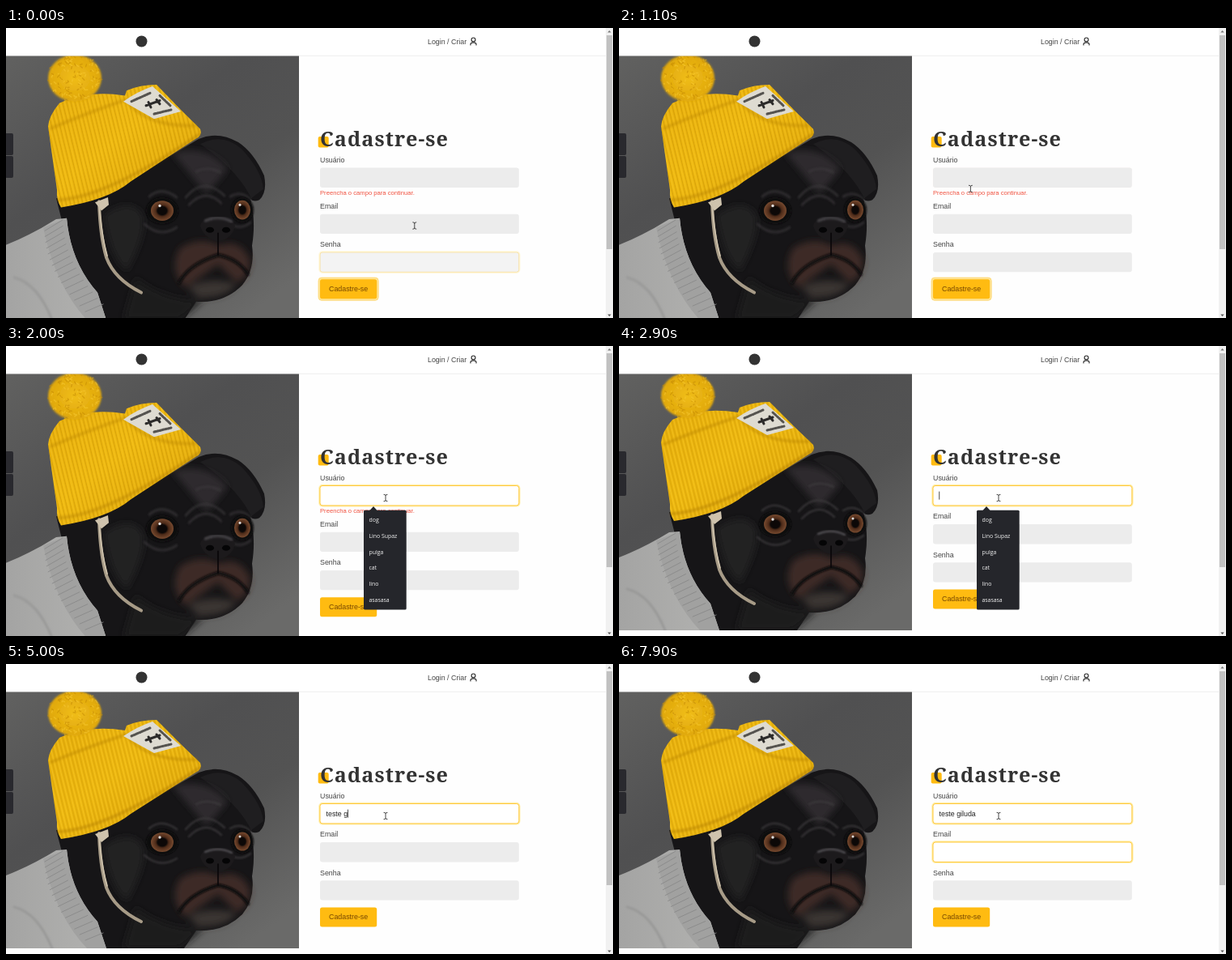
These frames come from a looping animation (750x358 px, 8000 ms). An HTML page:

```html
<!DOCTYPE html>
<html lang="pt-BR">
<head>
<meta charset="utf-8">
<title>Cadastre-se</title>
<style>
html, body { margin: 0; width: 100%; height: 100%; overflow: hidden; background: #fefefe; }
svg { display: block; width: 100vw; height: 100vh; }
text { font: 8.85px "Liberation Sans", Arial, sans-serif; fill: #444; white-space: pre; }
.title { font: bold 25.2px "Noto Serif", Georgia, serif; letter-spacing: .04em; fill: #333; }
.error { font-size: 7.65px; fill: #f0513f; }
.list text { font: 6.9px "Open Sans", "Noto Sans", sans-serif; fill: #f4f4f4; }
.typed { fill: #222; }
.line { fill: none; stroke-linecap: round; stroke-linejoin: round; }
</style>
</head>
<body>
<svg viewBox="0 0 750 358" preserveAspectRatio="none">
  <defs>
    <linearGradient id="wall" x1="0" y1="0" x2=".8" y2="1">
      <stop offset="0" stop-color="#616160"/><stop offset=".4" stop-color="#505051"/><stop offset=".65" stop-color="#535353"/><stop offset="1" stop-color="#6a6a69"/>
    </linearGradient>
    <linearGradient id="wool" x1="0" y1="0" x2="1" y2="1">
      <stop offset="0" stop-color="#e8b00c"/><stop offset=".45" stop-color="#f0bb10"/><stop offset="1" stop-color="#d9a108"/>
    </linearGradient>
    <radialGradient id="pom"><stop offset="0" stop-color="#f0bd1a"/><stop offset="1" stop-color="#dfa70b"/></radialGradient>
    <linearGradient id="shirt"><stop offset="0" stop-color="#a4a4a3"/><stop offset="1" stop-color="#b2b2b0"/></linearGradient>
    <radialGradient id="iris"><stop offset=".4" stop-color="#0c0807"/><stop offset=".58" stop-color="#4d2b19"/><stop offset="1" stop-color="#774a2f"/></radialGradient>
    <pattern id="rib" width="5" height="6" patternUnits="userSpaceOnUse" patternTransform="rotate(-14)">
      <path d="M1 0V6" stroke="#b98503" stroke-width="1" opacity=".5"/>
      <path d="M3.5 0V6" stroke="#f9cc3c" stroke-width=".8" opacity=".4"/>
    </pattern>
    <filter id="soft" x="-30%" y="-30%" width="160%" height="160%"><feGaussianBlur stdDeviation="4"/></filter>
    <filter id="fuzz" x="-30%" y="-30%" width="160%" height="160%"><feGaussianBlur stdDeviation="1.3"/></filter>
    <clipPath id="frame"><rect y="34" width="362" height="317"/></clipPath>
    <path id="cap" d="M52 119Q53 106 66 91 100 75 147 82L149 76Q166 69 186 69L216 99 240 122Q243 130 234 134L154 185Q127 207 68 216 62 207 63 195Z"/>
  </defs>

  <g id="photo"><g clip-path="url(#frame)">
    <rect y="34" width="362" height="317" fill="url(#wall)"/>
    <path d="M62 205L128 195 210 150 238 134Q262 124 287 138 306 150 319 178 323 198 313 207 306 210 302 206 309 232 304 262 308 290 292 309 270 331 235 329L220 351H100Z" fill="#161517"/>
    <path d="M240 140Q268 126 291 146 316 172 318 194L303 205Q286 171 240 140Z" fill="#1f1e20"/>
    <g filter="url(#soft)">
      <path d="M120 225Q150 205 165 220T150 292Q130 280 120 225" fill="#232224"/>
      <path d="M205 150Q250 140 274 170L248 200Z" fill="#2d2c2d"/>
      <path d="M215 265Q240 250 262 262 290 252 302 280 300 300 285 306L262 284 222 312Q200 292 215 265" fill="#3d2c26"/>
      <path d="M225 312Q250 298 285 308 270 326 238 324" fill="#3a3431"/>
      <path d="M160 300Q200 330 245 326L215 351H145Z" fill="#1d1c1d"/>
    </g>
    <g class="line" stroke="#3d3b3d" stroke-width="2.5" filter="url(#fuzz)" opacity=".75">
      <path d="M177 203Q192 190 211 204M222 204Q244 178 270 202M226 213Q246 192 266 211M171 236Q190 253 211 240M277 203Q291 195 302 207M281 238Q292 242 302 234M235 173Q249 166 265 174"/>
    </g>
    <path d="M214 306Q226 284 262 273 286 277 299 296" class="line" stroke="#0b090a" stroke-width="4" filter="url(#fuzz)"/>
    <path d="M240 238Q244 226 262 227 280 227 283 238 280 253 263 257 244 253 240 238" fill="#1c1a1c"/>
    <path d="M246 232Q262 225 279 233" class="line" stroke="#59575b" stroke-width="2" filter="url(#fuzz)"/>
    <ellipse cx="252" cy="243" rx="5" ry="3.5" fill="#050506"/><ellipse cx="272" cy="243" rx="5" ry="3.5" fill="#050506"/>
    <path d="M262 247V273" class="line" stroke="#080608" stroke-width="1.6"/>
    <ellipse cx="193" cy="220" rx="20" ry="16" fill="#0a090a" filter="url(#fuzz)"/><ellipse cx="292" cy="219" rx="14" ry="15" fill="#0a090a" filter="url(#fuzz)"/>
    <ellipse cx="193" cy="220" rx="14" ry="12" fill="url(#iris)"/><ellipse cx="292" cy="219" rx="10" ry="11.5" fill="url(#iris)"/>
    <g fill="#ddd"><circle cx="190" cy="214" r="1.7"/><circle cx="289" cy="213" r="1.5"/></g>

    <path d="M0 261Q31 249 62 230L75 229Q80 282 113 318L124 351H0Z" fill="url(#shirt)"/>
    <path d="M46 240L75 229Q80 282 113 318L124 351H100Q61 310 46 240" fill="#a1a1a0"/>
    <g id="ribs" class="line" stroke="#8a8a8a" stroke-width=".9"></g>
    <path d="M10 300Q39 307 57 351" class="line" stroke="#999998" stroke-width="3" filter="url(#fuzz)"/>
    <path d="M115 209Q116 249 124 276 134 302 167 318" class="line" stroke="#a79b87" stroke-width="4"/>
    <path d="M110 210L126 204 127 213 118 220Z" fill="#cfc3ad"/>
    <path d="M115 212Q118 250 125 274" class="line" stroke="#cdc1ab" stroke-width="1.8"/>

    <use href="#cap" fill="url(#wool)"/>
    <use href="#cap" fill="url(#rib)"/>
    <path d="M56 121Q102 102 148 87 173 120 234 118" class="line" stroke="#b88304" stroke-width="4" opacity=".4" filter="url(#fuzz)"/>
    <path d="M65 207Q125 204 238 129" class="line" stroke="#ad7904" stroke-width="4" opacity=".4" filter="url(#fuzz)"/>
    <ellipse cx="85" cy="61" rx="33" ry="28" fill="url(#pom)" filter="url(#fuzz)"/>
    <g id="tufts" class="line" stroke-width="1.4" opacity=".6"></g>
    <path d="M145 89Q163 77 181 71L216 101 183 110Z" fill="#dedbd1"/>
    <path d="M155 89L178 79M183 104L204 99M190 82L203 94" class="line" stroke="#55534f" stroke-width="3" stroke-dasharray="2 1.5"/>
    <path d="M173 94L190 88M176 90L179 96M186 87L190 92" class="line" stroke="#2c2b2a" stroke-width="3"/>
  </g></g>

  <path d="M0 130H7Q9 130 9 132V155Q9 157 7 157H0ZM0 158H7Q9 158 9 160V183Q9 185 7 185H0Z" fill="#29292e"/>
  <rect width="741" height="34" fill="#fff"/>
  <path d="M0 34.3H741" stroke="#e8e8e8" stroke-width=".7"/>
  <circle cx="167.5" cy="16.5" r="7" fill="#333"/>
  <text x="521" y="19.5">Login / Criar</text>
  <g class="line" stroke="#333" stroke-width="1.2"><circle cx="577.5" cy="14.4" r="2.4"/><path d="M574 21V20Q574.2 17.8 577.5 17.8T581 20V21"/></g>

  <rect x="741" width="9" height="358" fill="#f1f1f1"/>
  <rect x="742" y="9" width="7" height="264" fill="#c1c1c1"/>
  <path d="M743.3 5.5L745.5 3 747.7 5.5Z" fill="#777"/><path d="M743.3 353.5L745.5 356 747.7 353.5Z" fill="#555"/>

  <rect x="385.7" y="134" width="13" height="13.5" rx="2" fill="#fb1"/>
  <text class="title" x="388" y="146">Cadastre-se</text>

  <g id="user" transform="translate(388 172.5)"></g>
  <text id="error" class="error" x="388" y="206">Preencha o campo para continuar.</text>
  <g id="lower">
    <g id="email" transform="translate(388 220)"></g>
    <g id="pass" transform="translate(388 267.2)"></g>
    <g id="button">
      <rect id="ring" x="386" y="298.4" width="74.2" height="28.2" rx="4" fill="#ffe596" stroke="#fdd367" stroke-width=".7"/>
      <rect x="388" y="300.5" width="70.2" height="24" rx="2.5" fill="#fb1"/>
      <text x="399" y="315.3" style="fill:#764701">Cadastre-se</text>
    </g>
  </g>
  <text id="typed" class="typed" x="395.5" y="187.6"></text>
  <rect id="caret" width=".8" height="10" fill="#222"/>
  <g id="history" class="list"></g>
  <g id="match" class="list"></g>
  <path id="mouse" class="line" d="M-2-4.2Q0-4.2 0-3V3Q0 4.2-2 4.2M2-4.2Q0-4.2 0-3M0 3Q0 4.2 2 4.2" stroke="#333" stroke-width=".9"/>
</svg>
<script>
const $ = id => document.getElementById(id);
const clamp = v => Math.max(0, Math.min(1, v));
const show = (id, on) => { $(id).style.display = on ? '' : 'none'; };

function addField(id, label) {
  const box = 'width="245.8" height="24.4" rx="3"';
  $(id).innerHTML = `<text y="-6.6">${label}</text>
    <rect ${box} fill="#ececec"/>
    <g class="glow"><rect ${box} fill="#fff" stroke="#fea" stroke-width="3.4"/>
    <rect ${box} fill="#fff" stroke="#fb1" stroke-width=".8"/></g>`;
}
addField('user', 'Usuário');
addField('email', 'Email');
addField('pass', 'Senha');

function addList(id, width, items) {
  const rows = items.map((item, i) => `<text x="448.5" y="${217 + i * 19.8}">${item}</text>`).join('');
  $(id).innerHTML = `<path d="M449 203.5L454 198 459 203.5Z" fill="#25262b"/>
    <rect x="442" y="202.8" width="${width}" height="${4 + items.length * 19.8}" rx="1.5" fill="#25262b"/>${rows}`;
}
addList('history', 52.7, ['dog', 'Lino Supaz', 'pulga', 'cat', 'lino', 'asasasa']);
addList('match', 59.3, ['testedelivro']);

// Collar ribs and pompom yarn
let seed = 7;
const random = () => (seed = seed * 16807 % 2147483647) / 2147483647;
$('ribs').innerHTML = Array.from({ length: 15 }, (_, i) => {
  const k = i / 14, x = 48 + 50 * k * k, y = 244 + 97 * k;
  return `<path d="M${x} ${y}L${x + 22} ${y - 13 + 4 * k}"/>`;
}).join('');
$('tufts').innerHTML = Array.from({ length: 170 }, () => {
  const a = random() * 6.283, r = Math.sqrt(random());
  const x = 85 + 33 * r * Math.cos(a), y = 61 + 28 * r * Math.sin(a);
  const color = ['#c78e05', '#f6c72f', '#e8b20f'][random() * 3 | 0];
  return `<path d="M${x} ${y}l${random() * 6 - 3} ${random() * 6 - 3}" stroke="${color}"/>`;
}).join('');

const LOOP = 8000, FOCUS = 1500, VALID = 2400, NO_MATCH = 4290, TAB = 7350;
const phrase = 'teste giluda';
const keys = [3300, 3500, 3700, 3900, 4000, 4200, 4900, 6300, 6400, 6600, 6700, 7000];
const caretStarts = [FOCUS, ...keys, TAB];
const path = [[0, 505, 244], [500, 398, 253], [800, 382, 215], [1300, 469, 187.5]];

function mouseAt(t) {
  for (let i = 1; i < path.length; i++) {
    const [t0, x0, y0] = path[i - 1], [t1, x1, y1] = path[i];
    if (t < t1) {
      const k = (t - t0) / (t1 - t0);
      return [x0 + (x1 - x0) * k, y0 + (y1 - y0) * k];
    }
  }
  return path[path.length - 1].slice(1);
}

const fade = (t, from) => clamp((t - from) / 200);
const glow = (id, amount) => { $(id).querySelector('.glow').style.opacity = amount; };

function draw(t) {
  const invalid = t < VALID;
  show('error', invalid);
  $('lower').setAttribute('transform', `translate(0 ${invalid ? 9.7 : 0})`);
  $('photo').setAttribute('transform', invalid ? 'translate(0 34) scale(1 1.03) translate(0 -34)' : '');

  glow('user', fade(t, 1100));
  glow('email', fade(t, 60) - fade(t, 420) + fade(t, 7280));
  glow('pass', 1 - fade(t, -120));
  $('ring').style.opacity = 1 - fade(t, FOCUS);

  const count = keys.filter(k => k <= t).length;
  $('typed').textContent = phrase.slice(0, count);
  show('history', t >= 1600 && t < keys[0]);
  show('match', t >= keys[0] && t < NO_MATCH);

  const start = caretStarts.filter(s => s <= t).pop();
  show('caret', start !== undefined && Math.floor((t - start) / 500) % 2 === 0);
  const inEmail = t >= TAB;
  $('caret').setAttribute('x', 395.4 + (inEmail || !count ? 0 : $('typed').getComputedTextLength()));
  $('caret').setAttribute('y', inEmail ? 227.2 : 179.6);

  $('mouse').setAttribute('transform', `translate(${mouseAt(t)})`);
}

const begin = performance.now();
function tick(now) {
  draw(Math.max(0, now - begin) % LOOP);
  requestAnimationFrame(tick);
}
draw(0);
requestAnimationFrame(tick);
</script>
</body>
</html>
```
